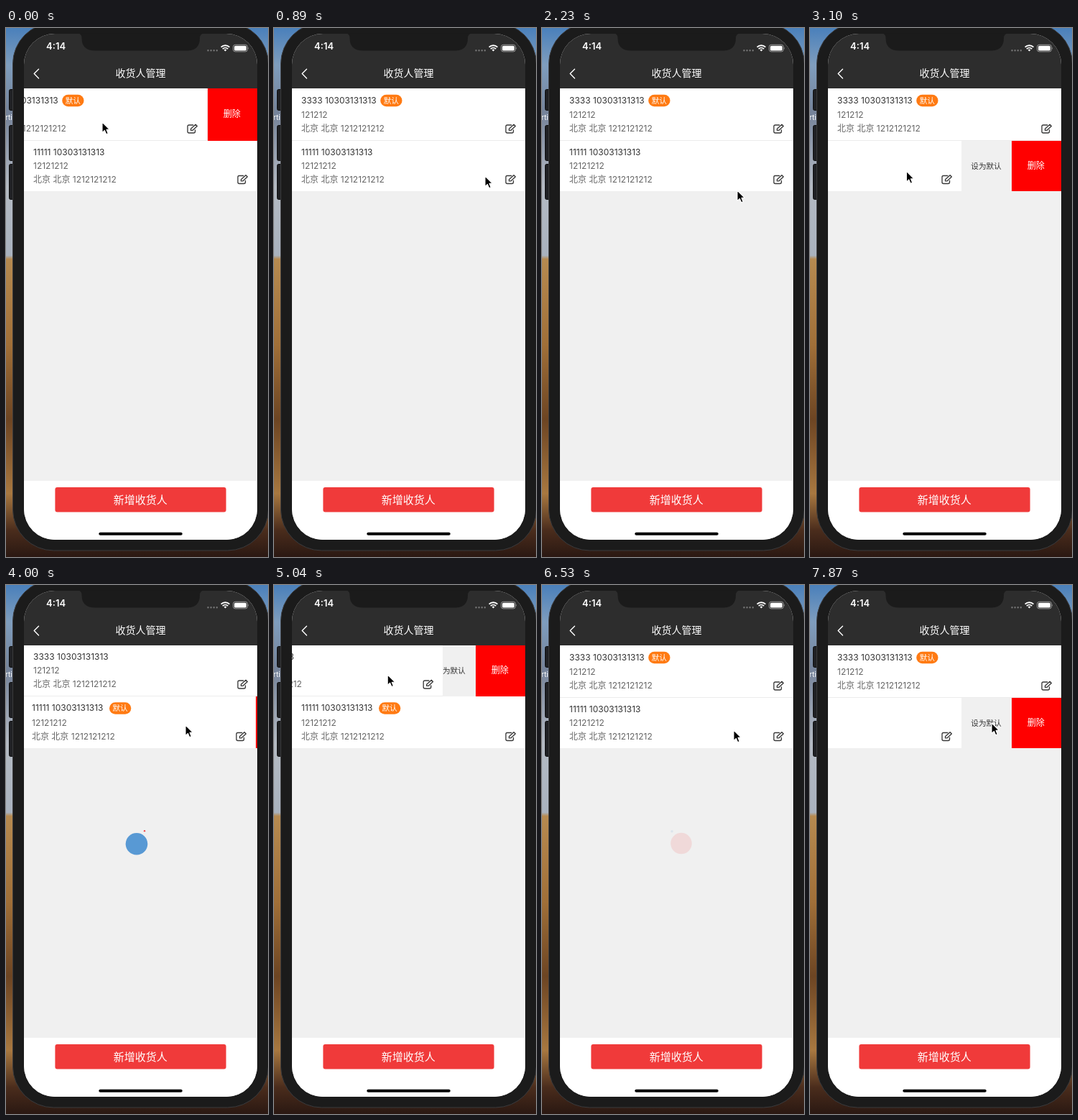
Write an HTML page that moves like this. It is 365 px wide and 736 px high and loops after 8000 ms.

```html
<!DOCTYPE html>
<html lang="zh-CN">
<head>
<meta charset="utf-8">
<title>收货人管理</title>
<style>
  html, body { margin: 0; width: 100%; height: 100%; overflow: hidden; background: #2a1812; }
  svg { display: block; width: 365px; height: 736px; }
  text { font-family: Inter, "Noto Sans CJK SC", "Noto Sans CJK", sans-serif; font-size: 12px; fill: #666; }
  .mid { text-anchor: middle; }
  .light { fill: #fff; }
  .dark { fill: #333; }
  .line { fill: none; stroke-linecap: round; stroke-linejoin: round; }
  .choose, .remove, .back, .rule { shape-rendering: crispEdges; }
</style>
</head>
<body>
<svg viewBox="0 0 365 736">
  <defs>
    <clipPath id="screen"><rect x="25" y="8" width="325" height="704" rx="43"/></clipPath>
    <linearGradient id="wall" x1="0" y1="0" x2="0" y2="1">
      <stop offset="0" stop-color="#4a80bb"/>
      <stop offset=".07" stop-color="#7f9dbd"/>
      <stop offset=".16" stop-color="#75839a"/>
      <stop offset=".3" stop-color="#b4bac3"/>
      <stop offset=".43" stop-color="#a9b2be"/>
      <stop offset=".437" stop-color="#b68a50"/>
      <stop offset=".6" stop-color="#a06f38"/>
      <stop offset=".74" stop-color="#6d4523"/>
      <stop offset=".88" stop-color="#a87840"/>
      <stop offset=".95" stop-color="#4a2c1c"/>
      <stop offset="1" stop-color="#2a1812"/>
    </linearGradient>
  </defs>

  <rect width="365" height="736" fill="url(#wall)"/>
  <text x="-1" y="128" class="light" style="font-size:10px">rti</text>

  <g fill="#202124" stroke="#0c0c0d">
    <rect x="4.5" y="85.5" width="8" height="29" rx="2"/>
    <rect x="4.5" y="135.5" width="8" height="49" rx="2"/>
    <rect x="4.5" y="189.5" width="8" height="49" rx="2"/>
  </g>
  <rect x="9.5" y="-7" width="356" height="734" rx="57" fill="#1b1b1b" stroke="#3b3b3d"/>

  <g clip-path="url(#screen)">
    <rect x="25" y="8" width="325" height="704" fill="#f0f0f0"/>
    <g id="rows"></g>
    <rect x="25" y="8" width="325" height="76" fill="#2d2d2d"/>
    <rect x="25" y="630" width="325" height="82" fill="#fff"/>
    <rect x="68.4" y="639" width="238.2" height="34.5" rx="3" fill="#f03a3a"/>
    <text x="187.3" y="662" class="mid light" style="font-size:15px">新增收货人</text>
    <rect x="129.3" y="701.7" width="116.4" height="4" rx="2" fill="#000"/>
  </g>

  <path d="M100 7.5Q105.5 8 105.5 14Q105.5 31.5 124 31.5H252Q270 31.5 270 14Q270 8 276 7.5Z" fill="#1b1b1b"/>
  <text x="69.6" y="30.2" class="mid light" style="font-size:13px;font-weight:600">4:14</text>
  <path d="M281.5 31.2h12.5" class="line" stroke="#777" stroke-width="2.4" stroke-dasharray="0 4.1"/>
  <g class="line" stroke="#fff" stroke-width="1.9" transform="translate(0 -.6)" style="stroke-linecap:butt">
    <path d="M299.6 27.2a8.6 8.6 0 0 1 11.8 0M301.8 29.7a5.3 5.3 0 0 1 7.4 0"/>
    <path d="M303.6 31.1a2.8 2.8 0 0 1 3.8 0L305.5 33Z" fill="#fff" stroke="none"/>
  </g>
  <rect x="316.5" y="23.3" width="19.8" height="9.6" rx="2.8" fill="none" stroke="#a5a5a5" stroke-width=".9"/>
  <rect x="318" y="24.8" width="16.8" height="6.6" rx="1.5" fill="#fff"/>
  <path d="M337.4 26.4q1.4 1.7 0 3.4z" fill="#a5a5a5"/>
  <path d="M45.5 57.3L39.2 63.6L45.5 69.9" class="line" stroke="#fff" stroke-width="1.4"/>
  <text x="187.5" y="68.2" class="mid light" style="font-size:14px">收货人管理</text>

  <g id="loader">
    <circle id="blue" fill="#5899d4"/>
    <circle id="red" fill="#f04a4a"/>
  </g>
  <path id="cursor" d="M1 1V15.6L4.4 12.4L6.7 17.8L9.2 16.7L7 11.4H11.4Z" fill="#000" stroke="#fff" stroke-width="1.1" stroke-linejoin="round"/>
</svg>

<script>
// Times are counted in picture steps
const LOOP = 8000, STEP = 148.5, OPEN = -139, HALF_OPEN = -70;
const $ = id => document.getElementById(id);
const clamp = (v, low, high) => Math.max(low, Math.min(high, v));
const smooth = k => k * k * (3 - 2 * k);

// Where the pointer turns or rests: [step, x, y]
const stops = [
  [0, 133, 130], [6, 293, 205], [9, 280, 298], [15, 271, 225], [19, 120, 199], [24, 249, 194], [28, 249, 194],
  [32, 272, 126], [35, 117, 123], [39, 248, 116], [41, 248, 116], [44, 266, 201], [48, 115, 196], [53, 252, 191]
];

// Each drag opens a row; tapping its button closes it and makes it the default
const drags = [
  { row: 1, from: 15, to: 19, tap: 25, loaded: 28 },
  { row: 0, from: 32, to: 35, tap: 41, loaded: 42 },
  { row: 1, from: 44, to: 48, tap: Infinity, loaded: Infinity }
];

function pointer(step) {
  const next = stops.findIndex(stop => stop[0] > step);
  if (next < 0) return stops[stops.length - 1].slice(1);
  const [a, b] = [stops[next - 1], stops[next]];
  const k = smooth((step - a[0]) / (b[0] - a[0]));
  return [1, 2].map(i => a[i] + (b[i] - a[i]) * k);
}

const travel = (from, to) => pointer(to)[0] - pointer(from)[0];

function rowShift(row, step) {
  const drag = drags.filter(d => d.row === row && d.from <= step).pop();
  if (!drag) return row === 0 ? clamp(HALF_OPEN + travel(0, Math.min(step, 6)), OPEN, 0) : 0;
  const open = clamp(travel(drag.from, Math.min(step, drag.to)), OPEN, 0);
  const shift = step > drag.tap ? open * .12 ** (step - drag.tap) : open;
  return Math.abs(shift) < .5 ? 0 : shift;
}

function defaultRow(step) {
  const done = drags.filter(d => step > d.tap).pop();
  return done ? done.row : 0;
}

function set(node, attrs) {
  for (const name in attrs) node.setAttribute(name, attrs[name]);
}

const visibility = on => on ? 'visible' : 'hidden';

function makeRow({ lines, badgeX, last }) {
  const group = document.createElementNS('http://www.w3.org/2000/svg', 'g');
  group.innerHTML = `
    <g class="buttons">
      <rect class="choose" x="211.5" width="70" fill="#f0f0f0"/>
      <rect class="remove" x="280.5" width="69.5" fill="#f00"/>
      <text class="label mid dark" x="245.5" style="font-size:10.6px">设为默认</text>
      <text class="label mid light" x="314.8">删除</text>
    </g>
    <g class="slide">
      <rect class="back" x="25" width="325" fill="#fff"/>
      <rect class="rule" x="25" width="325" height="1" fill="${last ? '#fff' : '#ececec'}"/>
      ${lines.map((t, i) => `<text class="info${i ? '' : ' dark'}" x="38">${t}</text>`).join('')}
      <g class="badge">
        <rect x="${badgeX}" y="8.8" width="30.3" height="16.4" rx="8.2" fill="#ff7a12"/>
        <text class="mid light" x="${badgeX + 15.1}" y="20.9" style="font-size:10.6px">默认</text>
      </g>
      <g class="edit line" stroke="#3a3a3a" stroke-width="1.35">
        <path d="M4 2V4a2 2 0 0 1-2 2H-4.5a2 2 0 0 1-2-2V-3a2 2 0 0 1 2-2H1.2"/>
        <path d="M-2 2.4V.2L4.6-5.8L6.8-3.6L.4 2.4Z"/>
      </g>
    </g>`;
  $('rows').append(group);
  const one = s => group.querySelector('.' + s), all = s => group.querySelectorAll('.' + s);

  return (top, shift, chosen) => {
    const height = chosen ? 72.5 : 70.5;
    const centers = chosen ? [16.5, 37, 56] : [16, 35, 54];
    const [choose, remove] = all('label');
    set(group, { transform: `translate(0 ${top})` });
    set(one('slide'), { transform: `translate(${shift} 0)` });
    set(one('buttons'), { display: shift ? 'inline' : 'none' });
    for (const name of ['choose', 'remove', 'back']) set(one(name), { height });
    for (const node of [one('choose'), choose]) set(node, { visibility: visibility(!chosen) });
    for (const node of [choose, remove]) set(node, { y: height / 2 + 4.2 });
    set(one('rule'), { y: height - 1 });
    set(one('badge'), { visibility: visibility(chosen) });
    set(one('edit'), { transform: `translate(329.5 ${centers[2]})` });
    all('info').forEach((node, i) => set(node, { y: centers[i] + 4.4 }));
    return top + height;
  };
}

const place = '北京 北京 1212121212', phone = '10303131313';
const rows = [
  makeRow({ lines: ['3333 ' + phone, '121212', place], badgeX: 148.2 }),
  makeRow({ lines: ['11111 ' + phone, '12121212', place], badgeX: 146, last: true })
];

// Two balls circle a common centre and grow in turn
function drawLoader(step) {
  const angle = (31.4 + (step - 27) * 27.7) * Math.PI / 180;
  ['red', 'blue'].forEach((name, i) => {
    const a = angle + i * Math.PI;
    set($(name), {
      cx: 187.5 + 10.6 * Math.sin(a),
      cy: 351.2 - 10.6 * Math.cos(a),
      r: 16.5 * (1 - Math.cos(a)) / 2
    });
  });
  const fades = drags.filter(d => d.tap <= step)
    .map(d => Math.min((step - d.tap + 1) / 1.6, 1 - (step - d.loaded) / 2.3));
  set($('loader'), { opacity: clamp(Math.max(0, ...fades), 0, 1) });
}

function draw(step) {
  const chosen = defaultRow(step);
  let top = 84;
  rows.forEach((row, i) => { top = row(top, rowShift(i, step), chosen === i); });
  drawLoader(step);
  set($('cursor'), { transform: `translate(${pointer(step).join(' ')})` });
}

const start = performance.now();
let shown = -1;
function tick() {
  const time = (performance.now() - start) % LOOP;
  const step = Math.floor((time + 10) / STEP);
  if (step !== shown) draw(shown = step);
  requestAnimationFrame(tick);
}
tick();
</script>
</body>
</html>
```
